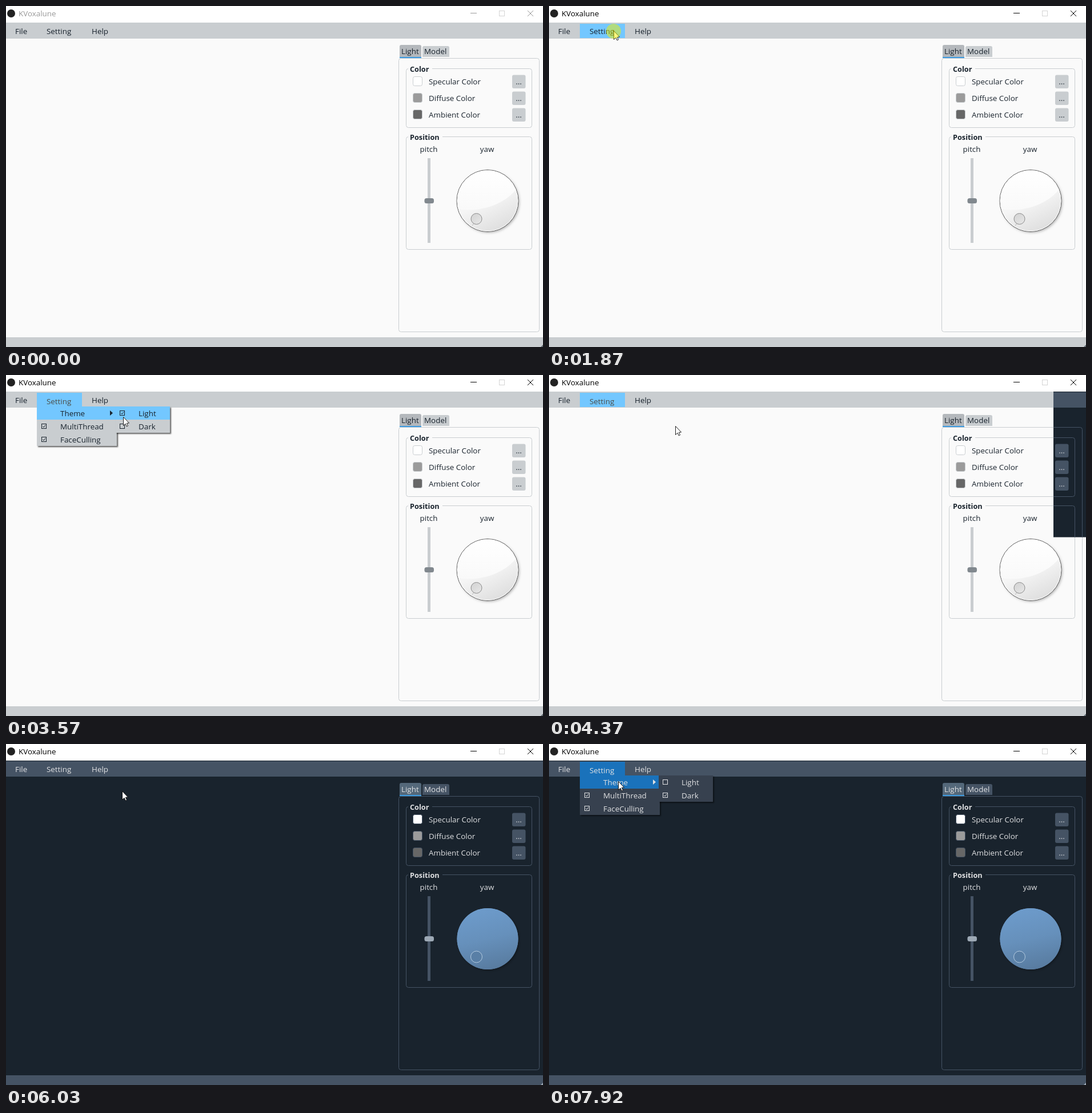
These frames come from a looping animation (940x596 px, 7.99 s). An HTML page with a canvas:

```html
<!DOCTYPE html>
<html>
<head>
<meta charset="utf-8">
<style>
html, body { margin: 0; width: 940px; height: 596px; overflow: hidden; background: #fafafa; }
canvas { display: block; }
</style>
</head>
<body>
<canvas id="stage" width="940" height="596"></canvas>
<script>
const ctx = document.getElementById('stage').getContext('2d');
const LOOP = 7990, STEP = 70, W = 940, H = 596;
const FONT = '13.4px "Open Sans", "Noto Sans", sans-serif';
const BOLD = 'bold 12.7px "Open Sans", "Noto Sans", sans-serif';

const LIGHT = {
  dark: false, bg: '#fafafa', bar: '#c9cdd0', menu: '#c9cdd0', tab: '#b4b8bc', text: '#19232d',
  hover: '#73c7ff', pressed: '#4c4d48', handle: '#81888e', shadow: 'rgba(0,0,0,.6)'
};
const DARK = {
  dark: true, bg: '#19232d', bar: '#455364', menu: '#37414f', tab: '#54687a', text: '#e0e1e3',
  hover: '#1a72bb', pressed: '#e0e1e3', handle: '#9da9b5', shadow: 'rgba(0,0,0,.5)'
};

// Spans of activity; between them the picture rests.
const SPANS = [[70, 840], [910, 1470], [1870, 2080], [2340, 2890], [3150, 3770],
  [4230, 4440], [5890, 6650], [6910, 7590], [7720, 7920]];
// Pointer keys: time, x, y
const PATH = [[70, 728, 544], [840, 130, 88], [910, 130, 88], [1470, 113, 43], [2340, 113, 43],
  [2680, 117, 66], [3150, 117, 66], [3490, 202, 70], [3770, 221, 89], [5890, 221, 89],
  [6420, 101, 42], [6910, 101, 42], [7380, 106, 62], [7720, 106, 62], [7920, 121, 65]];
const CLICKS = [[1870, 2080], [2680, 2890], [4230, 4300], [6440, 6650], [7380, 7720]];

const clamp = v => Math.max(0, Math.min(1, v));
const within = (p, x0, y0, x1, y1) => p && p.x >= x0 && p.x < x1 && p.y >= y0 && p.y < y1;

function snap(t) {
  let out = 0;
  for (const [a, b] of SPANS) {
    if (t >= b) out = b;
    else if (t >= a) out = Math.max(a, b - Math.ceil((b - t) / STEP) * STEP);
  }
  return out;
}

function pointer(t) {
  if (t < PATH[0][0]) return null;
  for (let i = 1; i < PATH.length; i++) {
    const [t0, x0, y0] = PATH[i - 1], [t1, x1, y1] = PATH[i];
    if (t > t1) continue;
    let k = (t - t0) / (t1 - t0);
    k = k * k * (3 - 2 * k);
    return { x: Math.round(x0 + (x1 - x0) * k), y: Math.round(y0 + (y1 - y0) * k) };
  }
  const [, x, y] = PATH[PATH.length - 1];
  return { x, y };
}

function rect(x, y, w, h, fill) {
  ctx.fillStyle = fill;
  ctx.fillRect(x, y, w, h);
}

function round(x, y, w, h, r, fill, stroke) {
  ctx.beginPath();
  ctx.roundRect(x, y, w, h, r);
  paint(fill, stroke);
}

function circle(x, y, r, fill, stroke) {
  ctx.beginPath();
  ctx.arc(x, y, r, 0, 7);
  paint(fill, stroke);
}

function paint(fill, stroke) {
  if (fill) { ctx.fillStyle = fill; ctx.fill(); }
  if (stroke) { ctx.strokeStyle = stroke; ctx.stroke(); }
}

function poly(points, fill, stroke) {
  ctx.beginPath();
  points.forEach(([x, y]) => ctx.lineTo(x, y));
  if (fill) ctx.closePath();
  paint(fill, stroke);
}

// y is the middle of the capitals
function text(s, x, y, color, font = FONT, align = 'left') {
  ctx.font = font;
  ctx.textAlign = align;
  ctx.fillStyle = color;
  ctx.fillText(s, x, y + 5);
}

function titleBar(active) {
  const ink = active ? '#000' : '#999';
  rect(0, 0, W, 29, '#fff');
  circle(9, 13, 7, '#222');
  text('KVoxalune', 22, 13, ink);
  rect(813, 12, 11, 1, ink);
  ctx.strokeStyle = '#d4d4d4';
  ctx.strokeRect(863.5, 8.5, 9, 9);
  poly([[913, 8], [923, 18]], null, ink);
  poly([[923, 8], [913, 18]], null, ink);
}

function group(title, y, h, gapEnd, c) {
  round(700.5, y + .5, 220, h, 4, null, c.bar);
  rect(704, y - 1, gapEnd - 704, 4, c.bg);
  text(title, 707, y + 1, c.text, BOLD);
}

function gradient(x0, y0, x1, y1, ...colors) {
  const g = ctx.createLinearGradient(x0, y0, x1, y1);
  colors.forEach((color, i) => g.addColorStop(i / (colors.length - 1), color));
  return g;
}

function dial(c) {
  const x = 843, y = 340.5;
  ctx.save();
  ctx.shadowColor = 'rgba(0,0,0,.3)';
  ctx.shadowBlur = 4;
  ctx.shadowOffsetX = ctx.shadowOffsetY = 2;
  circle(x, y, 53.5, c.dark ? '#6388b0' : '#eee');
  ctx.restore();
  if (c.dark) {
    circle(x, y, 53.5, gradient(830, 287, 855, 394, '#6d9bcb', '#6690bb', '#587b9f'));
    circle(823.5, 372, 10, '#597fa6', '#b4cbe0');
    return;
  }
  circle(x, y, 54, gradient(820, 290, 868, 390, '#fbfbfb', '#f5f5f5', '#dedede'));
  ctx.save();
  ctx.clip();
  ctx.beginPath();
  ctx.moveTo(780, 353);
  ctx.bezierCurveTo(825, 363, 875, 350, 900, 311);
  ctx.lineTo(900, 280);
  ctx.lineTo(780, 280);
  paint(gradient(0, 287, 0, 358, '#fff', '#f9f9f9'));
  ctx.restore();
  circle(x, y, 54, null, '#555');
  circle(x, y, 53, null, '#fff');
  poly([[816, 384], [819, 380]], null, '#bbb');
  circle(823.5, 372, 9.5, gradient(817, 364, 830, 381, '#d4d4d4', '#e6e6e6'), '#8b8b8b');
}

function windowBody(c) {
  rect(0, 29, W, H - 29, c.bg);
  rect(0, c.dark ? 30 : 29, W, c.dark ? 27 : 28, c.bar);
  rect(0, 579, W, 17, c.bar);
  poly([[940, 592], [940, 596], [936, 596]], c.dark ? '#9da9b5' : '#60686f');
  text('File', 16, 44, c.text);
  text('Help', 150, 44, c.text);

  round(687.5, 91.5, 246, 478, 4, null, c.bar);
  round(689, 68, 38, 23, [3, 3, 0, 0], c.tab);
  rect(689, 89, 38, 2, '#3d9be0');
  round(729, 70, 47, 19, [3, 3, 0, 0], c.bar);
  text('Light', 692, 78.5, c.text);
  text('Model', 732, 79, c.text);

  group('Color', 109, 103, 746, c);
  [['Specular', '#fff'], ['Diffuse', '#9b9b9b'], ['Ambient', '#676767']].forEach(([name, fill], i) => {
    const y = 132 + 29 * i;
    round(712.5, y - 8.5, 16, 16, 3, fill, c.bar);
    text(name + ' Color', 740, y, c.text);
    round(886, y - 11.5, 23.5, 23.5, 3, c.bar);
    text('...', 897.5, y, c.text, FONT, 'center');
  });

  group('Position', 228, 197, 764, c);
  text('pitch', 740, 250, c.text, FONT, 'center');
  text('yaw', 842, 250, c.text, FONT, 'center');
  rect(738, 266, 5, 148, c.bar);
  round(732.5, 336, 16.5, 9, 3.5, c.handle);
  dial(c);
}

function settingButton(c, lit, open) {
  if (lit) rect(54, 31, 79, 25, c.hover);
  text('Setting', 71, open ? 45.5 : 44, open ? c.pressed : c.text);
}

function checkBox(x, y, on, c) {
  ctx.strokeStyle = c.text;
  ctx.strokeRect(x - 4, y - 4, 8, 8);
  if (on) poly([[x - 2, y], [x - .5, y + 2], [x + 2.5, y - 2]], null, c.text);
}

function panel(x, y, w, h, c) {
  ctx.save();
  ctx.shadowColor = c.shadow;
  ctx.shadowBlur = 2;
  ctx.shadowOffsetX = ctx.shadowOffsetY = 1.5;
  rect(x, y, w, h, c.menu);
  ctx.restore();
}

function menu(c, p, alpha, subAlpha) {
  if (alpha <= 0) return;
  ctx.globalAlpha = alpha;
  panel(54, 55, 140, 69, c);
  const row = y => within(p, 54, y, 194, y + 23);
  [55, 78, 101].forEach((y, i) => {
    if (row(y) || (!i && subAlpha > 0)) rect(54, y, 139, 23, c.hover);
    text(['Theme', 'MultiThread', 'FaceCulling'][i], 95, y + 12, c.text);
    if (i) checkBox(66.5, y + 11.5, true, c);
  });
  poly([[182, 62], [187, 66.5], [182, 71]], c.text);

  if (subAlpha > 0) {
    ctx.globalAlpha = subAlpha;
    panel(192, 55, 95, 46, c);
    [55, 78].forEach((y, i) => {
      if (within(p, 194, y, 288, y + 23)) rect(192, y, 95, 23, c.hover);
      checkBox(203.5, y + 11.5, c.dark === !!i, c);
      text(['Light', 'Dark'][i], 232, y + 12, c.text);
    });
  }
  ctx.globalAlpha = 1;
}

function arrow({ x, y }, dark) {
  const shape = [[0, 0], [0, 15], [3.5, 11.7], [5.7, 16.5], [8, 15.4], [5.8, 10.8], [10, 10.5]];
  poly(shape.map(([dx, dy]) => [x + .5 + dx, y + .5 + dy]), '#fff', dark ? '#111' : '#222');
}

function draw(time) {
  const t = snap(time), p = pointer(t);
  const dark = t >= 4440, c = dark ? DARK : LIGHT;
  const open = dark ? t >= 6510 : t >= 1940;
  const menuAlpha = dark ? clamp((t - 6440) / 210) : t < 4300 ? clamp((t - 1870) / 210) : 0;
  const subAlpha = dark ? clamp((t - 7370) / 210) : t < 2750 ? 0 : clamp(.22 + (t - 2750) / 180);

  titleBar(t >= 1870);
  windowBody(c);
  settingButton(c, open || within(p, 54, 31, 133, 56), open);
  menu(c, p, menuAlpha, subAlpha);

  // The new theme first reaches the upper right corner.
  if (t >= 4370 && !dark) {
    ctx.save();
    ctx.beginPath();
    ctx.rect(883, 29, 57, 254.5);
    ctx.clip();
    windowBody(DARK);
    ctx.restore();
  }

  if (p) {
    arrow(p, dark);
    if (CLICKS.some(([a, b]) => t >= a && t < b)) circle(p.x, p.y + 1, 13, 'rgba(240,240,0,.5)');
  }
}

function tick() {
  draw(performance.now() % LOOP);
  requestAnimationFrame(tick);
}
tick();
</script>
</body>
</html>
```
